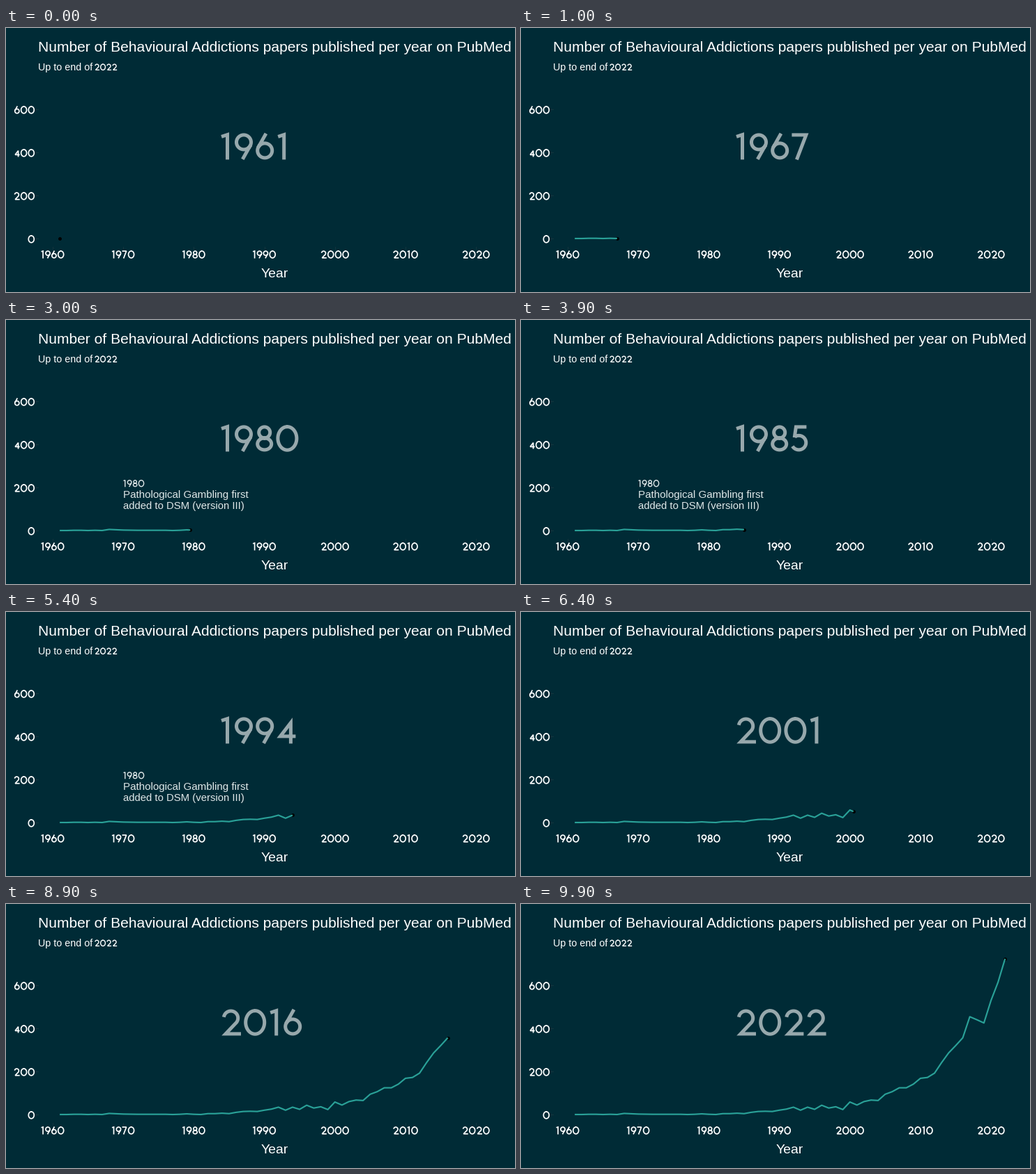
A matplotlib script for the animation above (10 s loop, 730 px wide and 380 px high).

```python
import numpy as np
import matplotlib.pyplot as plt
from matplotlib.animation import FuncAnimation
from matplotlib.patches import PathPatch
from matplotlib.path import Path

W, H, DPI = 730, 380, 100
PT = 72 / DPI  # points per pixel
FRAMES, INTERVAL = 100, 100

BG, LINE, WHITE = "#002B36", "#2AA198", "#FFFFFF"
YEAR_COLOR, NOTE_COLOR, TICK_COLOR = "#97A8AC", "#DFE6E7", "#14343D"

# Papers per year; 1974 has no entry
years = np.array([y for y in range(1961, 2023) if y != 1974])
papers = np.array([
    1, 1, 2, 2, 1, 2, 1, 6, 4.5,
    3, 2.5, 2, 2, 2, 2, 1, 2, 4,
    2, 1, 5, 5, 7, 5, 11, 15, 16, 15,
    21, 26, 35, 21, 35, 25, 44, 31, 37, 24,
    59, 45, 61, 68, 66, 95, 107, 125, 125, 142,
    169, 173, 193, 242, 287, 321, 357, 455, 441, 426,
    530, 615, 724,
])
keys = np.round((years - 1961) * (FRAMES - 1) / 61).astype(int)


def px(year):
    return 67 + (year - 1960) * 10.117


def py(value):
    return 303.3 - 0.31 * value


# --- monoline numerals, 38 units tall with a 5 unit stroke ---

def arc(cx, cy, rx, ry, a0, a1):
    t = np.radians(np.linspace(a0, a1, 48))
    return list(zip(cx + rx * np.cos(t), cy + ry * np.sin(t)))


six = [(14.7, 37.5)] + arc(13, 13, 10.5, 10.5, 150, 515)
DIGITS = {  # ink width, strokes
    "0": (32, [arc(16, 19, 13.5, 16.8, 90, 455)]),
    "1": (11, [[(0, 33), (8.5, 35.8), (8.5, 0)]]),
    "2": (28, [arc(13.5, 25.2, 10.2, 10.2, 172, -38) + [(6, 2.5), (28, 2.5)]]),
    "3": (25, [arc(12, 27.5, 8.5, 8, 155, -90),
               arc(12, 11, 10.3, 8.5, 90, -155)]),
    "4": (27, [[(20, 0), (20, 30), (5, 10.5), (27, 10.5)]]),
    "5": (24, [[(22, 35.5), (7, 35.5), (4.8, 20.5)]
               + arc(11, 12.8, 10.4, 10.3, 125, -150)]),
    "6": (26, [six]),
    "7": (24, [[(0, 35.5), (20.5, 35.5), (7, 0)]]),
    "8": (25, [arc(12.5, 27.5, 8, 8, -90, 275),
               arc(12.5, 11, 10, 8.5, 90, 455)]),
    "9": (26, [[(26 - x, 38 - y) for x, y in six]]),
}


def layout(text):
    """Left edge of each digit and the total width, in glyph units."""
    xs, x = [], 0
    for i, ch in enumerate(text):
        if i:
            x += 8 if text[i - 1] == "1" else 6 if ch == "1" else 4.2
        xs.append(x)
        x += DIGITS[ch][0]
    return xs, x


def number_path(text, x, base, scale, align=0):
    xs, width = layout(text)
    x -= align * width * scale
    verts, codes = [], []
    for ch, dx in zip(text, xs):
        for stroke in DIGITS[ch][1]:
            verts += [(x + (dx + u) * scale, base - v * scale)
                      for u, v in stroke]
            codes += [Path.MOVETO] + [Path.LINETO] * (len(stroke) - 1)
    return Path(verts, codes)


def number(text, x, base, scale, color=WHITE, align=0, weight=5.0):
    patch = PathPatch(number_path(text, x, base, scale, align), fill=False,
                      ec=color, lw=weight * scale * PT,
                      capstyle="butt", joinstyle="miter")
    return ax.add_patch(patch)


def words(text, x, base, size, color=WHITE, ha="left"):
    return ax.text(x, base, text, fontsize=size * PT, color=color, ha=ha,
                   va="baseline", family="Liberation Sans")


fig = plt.figure(figsize=(W / DPI, H / DPI), dpi=DPI, facecolor=BG)
ax = fig.add_axes([0, 0, 1, 1])
ax.set_xlim(0, W)
ax.set_ylim(H, 0)
ax.axis("off")

words("Number of Behavioural Addictions papers published per year on PubMed",
      46, 34, 21)
words("Up to end of", 46, 61, 14.2)
number("2022", 127, 61, 0.25, weight=5.6)
words("Year", 385.5, 359, 19.4, ha="center")

for v in range(0, 601, 200):
    number(str(v), 41, py(v) + 6.2, 0.295, align=1, weight=5.8)
    ax.plot([43, 46], [py(v)] * 2, color=TICK_COLOR, lw=PT)
for y in range(1960, 2021, 10):
    number(str(y), px(y), 331.6, 0.295, align=0.5, weight=5.8)
    ax.plot([px(y)] * 2, [314.5, 317.5], color=TICK_COLOR, lw=PT)

note = [
    number("1980", 168.5, 240.3, 0.27, NOTE_COLOR, weight=5.2),
    words("Pathological Gambling first", 168, 256, 15.1, NOTE_COLOR),
    words("added to DSM (version III)", 168, 272, 14.9, NOTE_COLOR),
]

BIG = dict(x=309, base=189.4, scale=1)
year_label = number("1961", color=YEAR_COLOR, **BIG)
dot, = ax.plot([], [], "o", color="black", ms=4.9 * PT, mew=0, zorder=4)
curve, = ax.plot([], [], color=LINE, lw=2.15 * PT, zorder=5,
                 solid_capstyle="butt", solid_joinstyle="round")


def update(frame):
    i = np.searchsorted(keys, frame, side="right") - 1
    x = px(np.interp(frame, keys, years))
    y = py(np.interp(frame, keys, papers))
    curve.set_data(np.append(px(years[:i + 1]), x),
                   np.append(py(papers[:i + 1]), y))
    curve.set_visible(frame > 0)
    dot.set_data([x], [y])

    # The label flips to the next year halfway between two entries
    j = min(i + 1, len(years) - 1)
    shown = years[j] if 2 * frame >= keys[i] + keys[j] else years[i]
    year_label.set_path(number_path(str(shown), **BIG))
    for part in note:
        part.set_visible(1980 <= shown < 1998)
    return [curve, dot, year_label, *note]


anim = FuncAnimation(fig, update, frames=FRAMES, interval=INTERVAL,
                     repeat=True, repeat_delay=0, blit=False)
plt.show()
```
